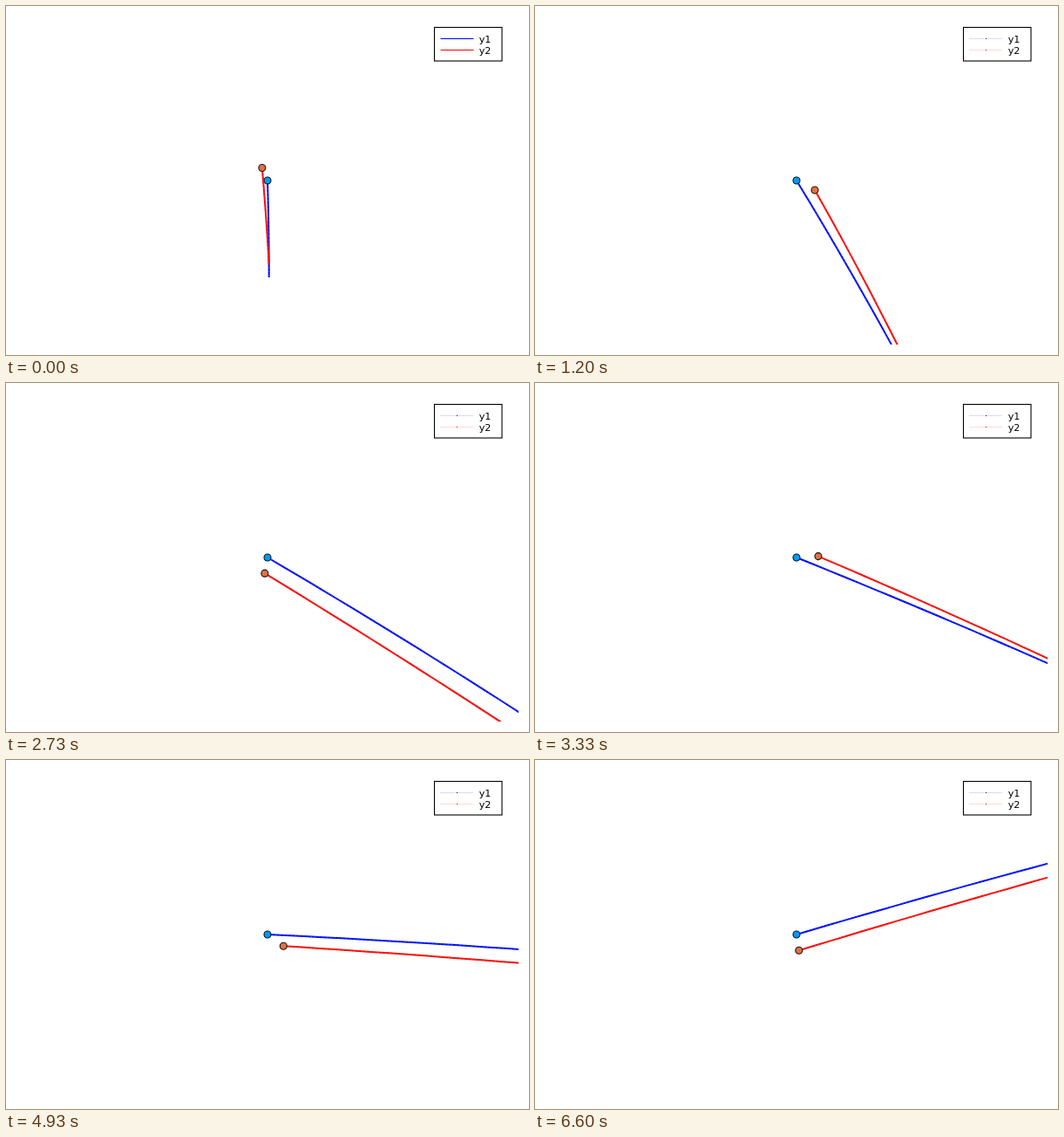
Animation of 600 by 400 pixels, one loop 6670 ms. Source, as an HTML page:

```html
<!DOCTYPE html>
<html lang="en">
<head>
<meta charset="utf-8">
<title>Two-body trails</title>
<style>
  html, body { margin: 0; width: 100%; height: 100%; overflow: hidden; background: #fff; }
  svg { display: block; width: 600px; height: 400px; }
  text { font: 11.2px "DejaVu Sans", sans-serif; fill: #000; }
  .trail { fill: none; stroke-width: 2; }
  .dots { fill: none; stroke-width: 1; stroke-dasharray: 1.5 3; stroke-opacity: .6; }
  .body { stroke: #111; stroke-width: 1.1; }
  .one { stroke: #00f; }
  .two { stroke: #f00; }
  .faint { stroke-dasharray: 1 1; stroke-opacity: .3; }
</style>
</head>
<body>
<svg viewBox="0 0 600 400">
  <defs><clipPath id="plot"><rect x="12" y="12" width="576" height="376"/></clipPath></defs>
  <g clip-path="url(#plot)">
    <polyline id="trail1" class="trail one"/>
    <polyline id="dots1" class="dots" stroke="#009afa"/>
    <circle class="body" cx="300" cy="200" r="4" fill="#009afa"/>
    <polyline id="trail2" class="trail two"/>
    <polyline id="dots2" class="dots" stroke="#e26f46"/>
    <circle id="moon" class="body" r="4" fill="#e26f46"/>
  </g>
  <rect x="491.5" y="24.5" width="77.5" height="38.5" fill="#fff" stroke="#000" stroke-width="1.1"/>
  <path class="key one" d="M498.5 37.5H536.5"/>
  <path class="key two" d="M498.5 50.5H536.5"/>
  <g id="keyDots">
    <rect x="517" y="37" width="1" height="1" fill="#113"/>
    <rect x="517" y="50" width="1" height="1" fill="#a11"/>
  </g>
  <text x="542.7" y="41.5">y1</text>
  <text x="542.7" y="54.5">y2</text>
</svg>
<script>
  const LOOP = 6670;
  const SX = 288, SY = 188;            // half the plot area, in px
  const SUN_DIST = 29.6, SUN_RATE = 0.01997;
  const AXIS = 0.0885, ECC = 0.1;
  const MOON_RATE = 12.67 * Math.PI / 180;
  const TAIL = 3, SUB = 8;

  const $ = id => document.getElementById(id);
  const keys = document.querySelectorAll('.key');

  function planet(t) {
    const a = SUN_RATE * t;
    return [SUN_DIST * Math.cos(a), SUN_DIST * Math.sin(a)];
  }

  // Kepler ellipse around the planet, nearest point straight up at t = 0
  function moonOffset(t) {
    const m = MOON_RATE * t;
    let e = m;
    for (let i = 0; i < 5; i++) e = m + ECC * Math.sin(e);
    return [
      -AXIS * Math.sqrt(1 - ECC * ECC) * Math.sin(e),
      AXIS * (Math.cos(e) - ECC)
    ];
  }

  function moon(t) {
    const p = planet(t), o = moonOffset(t);
    return [p[0] + o[0], p[1] + o[1]];
  }

  function drawTrail(n, orbit, t, toScreen) {
    const span = Math.min(t, TAIL), steps = span * SUB, points = [];
    for (let i = 0; i <= steps; i++) {
      points.push(toScreen(orbit(t - i / SUB)).map(v => v.toFixed(2)).join());
    }
    $('trail' + n).setAttribute('points', points.join(' '));
    $('dots' + n).setAttribute('points', points.join(' '));
  }

  function draw(step) {
    const t = step + 1, centre = planet(t);
    const toScreen = p => [
      300 + SX * (p[0] - centre[0]),
      200 - SY * (p[1] - centre[1])
    ];
    drawTrail(1, planet, t, toScreen);
    drawTrail(2, moon, t, toScreen);
    const [x, y] = toScreen(moon(t));
    $('moon').setAttribute('cx', x);
    $('moon').setAttribute('cy', y);
    keys.forEach(k => k.classList.toggle('faint', step > 0));
    $('keyDots').style.display = step > 0 ? '' : 'none';
  }

  let shown = -1;
  const start = performance.now();

  // 15 steps per second, on a clock of hundredths
  function tick() {
    const time = Math.max(0, performance.now() - start) % LOOP;
    const step = Math.min(99, Math.floor((Math.floor(time / 10) + 0.5) * 0.15));
    if (step !== shown) draw(shown = step);
    requestAnimationFrame(tick);
  }
  tick();
</script>
</body>
</html>
```
